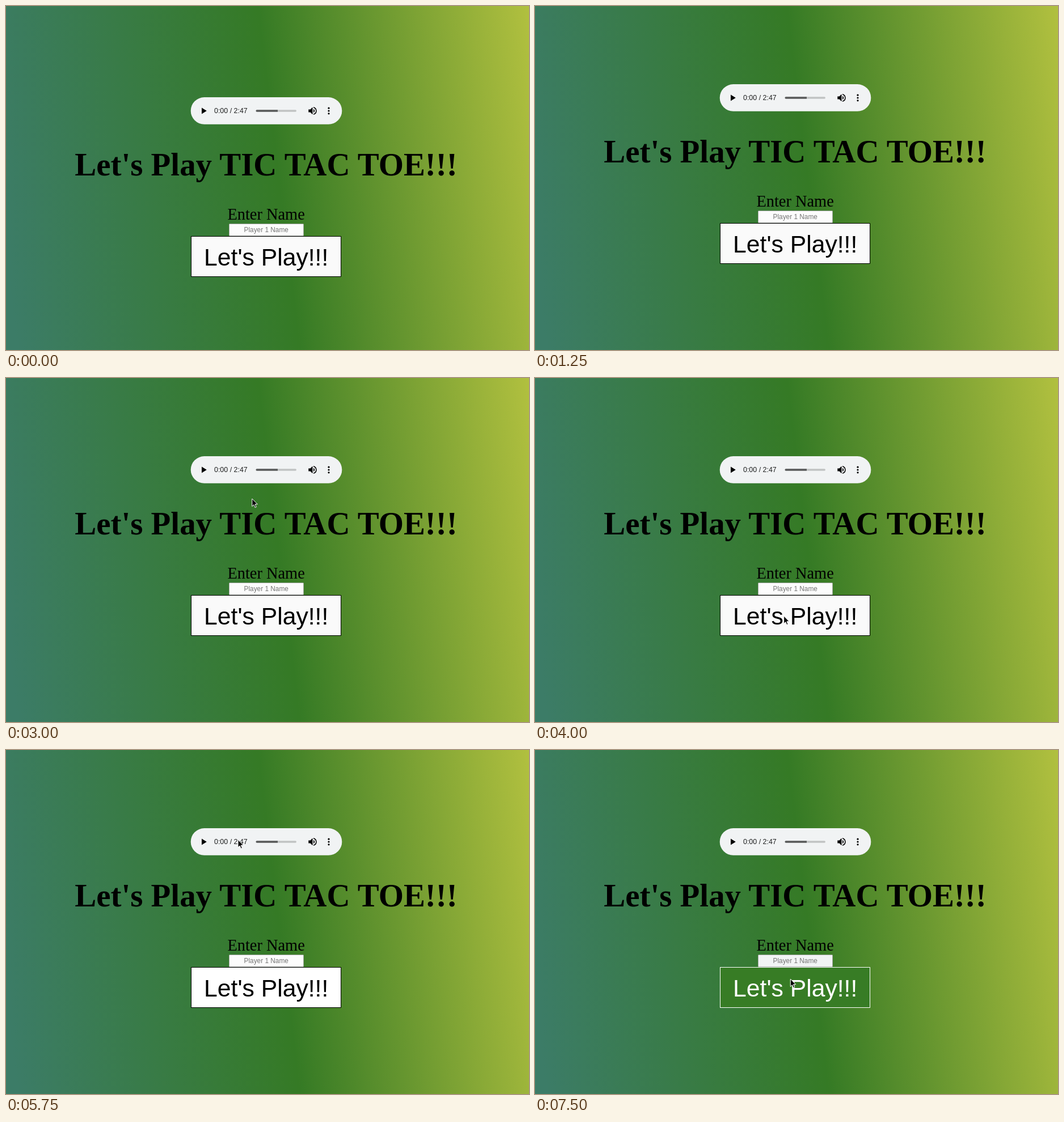
These frames come from a looping animation (922x607 px, 8 s). An HTML page:

```html
<!DOCTYPE html>
<html lang="en">
<head>
<meta charset="utf-8">
<title>Tic Tac Toe</title>
<style>
html, body { margin: 0; width: 100%; height: 100%; overflow: hidden; }
body { background: linear-gradient(83deg, #3c7c67 2%, #357a25 52%, #b1c03f 100%); }
svg { display: block; width: 100%; height: 100%; }
.serif { font-family: "Liberation Serif", "Times New Roman", serif; }
.sans { font-family: "Liberation Sans", Arial, sans-serif; }
.mid { text-anchor: middle; }
</style>
</head>
<body>
<svg viewBox="0 0 922 607">
  <g id="page">
    <g id="audio">
      <rect x="325.7" y="161.1" width="266.6" height="47.6" rx="23.8" fill="#f1f3f4"/>
      <path transform="translate(338.6 175.4) scale(.8)" d="M8 5v14l11-7z"/>
      <text class="sans" x="367" y="189.3" font-size="12.45" fill="#1f2020">0:00 / 2:47</text>
      <rect x="440.5" y="183.2" width="71.5" height="3.6" rx="1.8" fill="#c1c3c3"/>
      <path d="M442.3 183.2H479v3.6h-36.7a1.8 1.8 0 0 1 0-3.6z" fill="#5a5b5b"/>
      <path transform="translate(530.9 175.4) scale(.8)" d="M3 9v6h4l5 5V4L7 9H3zm13.5 3A4.5 4.5 0 0 0 14 7.97v8.05A4.5 4.5 0 0 0 16.5 12zM14 3.23v2.06a7 7 0 0 1 0 13.42v2.06a9 9 0 0 0 0-17.54z"/>
      <circle cx="569" cy="180.2" r="1.6"/>
      <circle cx="569" cy="185" r="1.6"/>
      <circle cx="569" cy="189.8" r="1.6"/>
    </g>
    <text class="serif mid" x="458.5" y="299" font-size="56.9" font-weight="700">Let's Play TIC TAC TOE!!!</text>
    <text class="serif mid" x="458.6" y="376.6" font-size="28.4">Enter Name</text>
    <rect id="field" x="393.5" y="384.5" width="131" height="21" rx="1" stroke="#a5a9a5"/>
    <text class="sans mid" x="458.7" y="398.6" font-size="11.85" fill="#757575">Player 1 Name</text>
    <rect id="button" x="326.5" y="406.5" width="264" height="71"/>
    <text id="label" class="sans mid" x="458.7" y="457.5" font-size="42.67">Let's Play!!!</text>
  </g>
  <path id="cursor" d="M.8 1v13.5l3.1-2.9 2.1 4.9 2.2-.9-2.1-4.9h4.2z" stroke="#fff"/>
</svg>
<script>
const LOOP = 8000, STEP = 250, SCROLL = 23;
const $ = id => document.getElementById(id);
const page = $("page"), field = $("field"), button = $("button"), label = $("label"), cursor = $("cursor");

// Pointer visits: key points, each reached by an ease-out of the given power and a sideways bow
const visits = [
  { end: 1250, keys: [{ t: 750, x: 418, y: 90 }, { t: 1000, x: 418, y: 228 }] },
  { end: 4750, keys: [
    { t: 3000, x: 433, y: 212 },
    { t: 3250, x: 410, y: 398 },
    { t: 3500, x: 410, y: 411 },
    { t: 4250, x: 438, y: 419, power: 5 },
    { t: 4500, x: 452, y: 191.5 }
  ] },
  { end: LOOP, keys: [
    { t: 5500, x: 418, y: 25 },
    { t: 6750, x: 407.8, y: 372.5, power: 2.15, bow: -10 },
    { t: 7250, x: 442, y: 416, power: 0.5, bow: -6 },
    { t: 7500, x: 449.5, y: 403 }
  ] }
];

const within = (t, from, to) => t >= from && t < to;

function pointerAt(t) {
  const visit = visits.find(v => within(t, v.keys[0].t, v.end));
  if (!visit) return null;
  const next = visit.keys.findIndex(k => k.t > t);
  if (next < 0) return visit.keys[visit.keys.length - 1];
  const a = visit.keys[next - 1], b = visit.keys[next];
  const u = (t - a.t) / (b.t - a.t);
  const e = 1 - (1 - u) ** (b.power || 1);
  return {
    x: a.x + (b.x - a.x) * e + (b.bow || 0) * Math.sin(Math.PI * u),
    y: a.y + (b.y - a.y) * e
  };
}

function draw(time) {
  const t = Math.floor(time / STEP) * STEP;
  const scrolled = within(t, 750, 1750) || t >= 3000;
  page.setAttribute("transform", `translate(0 ${scrolled ? -SCROLL : 0})`);

  const hover = within(t, 4250, 4500) || t >= 7000;
  const ink = hover ? "#fff" : "#000";
  button.setAttribute("fill", hover ? "#377c25" : t < 4250 ? "#fafafa" : "#fff");
  button.setAttribute("stroke", ink);
  label.setAttribute("fill", ink);
  field.setAttribute("fill", t >= 7500 ? "#f2f4f5" : t >= 6750 ? "#fff" : "#fcfcfc");

  const p = pointerAt(t);
  cursor.setAttribute("visibility", p ? "visible" : "hidden");
  if (p) cursor.setAttribute("transform", `translate(${p.x} ${p.y})`);
}

const start = performance.now();
function tick() {
  draw((performance.now() - start) % LOOP);
  requestAnimationFrame(tick);
}
tick();
</script>
</body>
</html>
```
